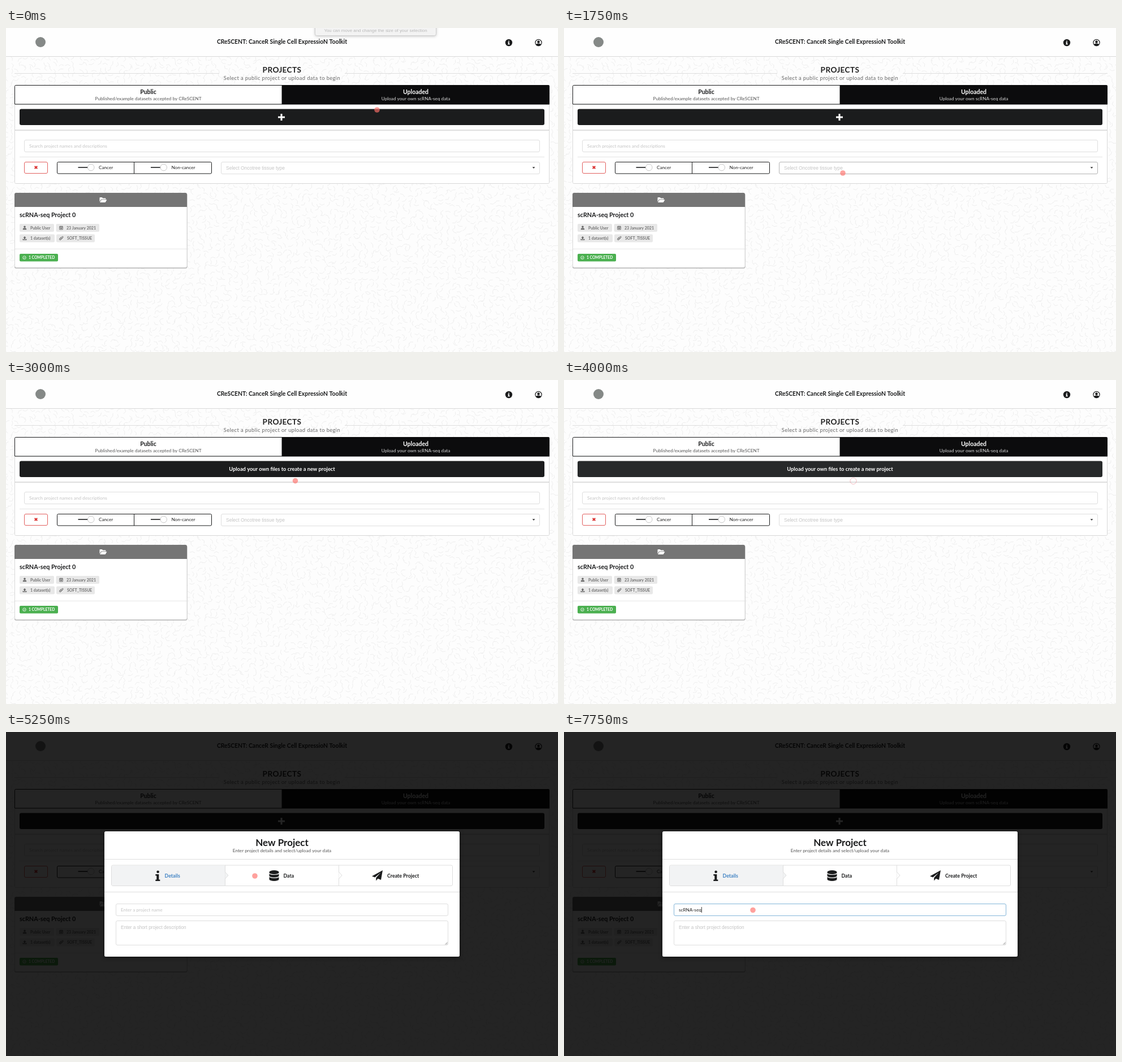
Animation, 976 px wide and 574 px high, one loop 8 s. Source, as an HTML page with a canvas:

```html
<!DOCTYPE html>
<html lang="en">
<head>
<meta charset="utf-8">
<title>Project upload walkthrough</title>
<style>
html, body { margin: 0; width: 100%; height: 100%; overflow: hidden; background: #fdfdfd; }
canvas { display: block; width: 976px; height: 574px; }
</style>
</head>
<body>
<canvas id="stage"></canvas>
<script>
const W = 976, H = 574, LOOP = 8000, STEP = 250;
const INK = '#1b1c1d', LINE = '#dedede', HINT = '#c4c4c4';
const LATO = 'Lato, sans-serif', ARIAL = '"Liberation Sans", Arial, sans-serif';
const canvas = document.getElementById('stage');
const ctx = canvas.getContext('2d');
const ratio = window.devicePixelRatio || 1;
canvas.width = W * ratio;
canvas.height = H * ratio;
ctx.scale(ratio, ratio);

// time, x, y of the pointer
const POINTER = [
  [0, 656, 145], [250, 560, 225], [500, 310, 335], [750, 113, 369], [1000, 230, 364],
  [1250, 440, 333], [1500, 478, 290], [1750, 493, 257], [2000, 497, 246], [2250, 504, 212],
  [2500, 510, 178], [2750, 511.5, 178.5], [4250, 511.5, 179], [4750, 510, 168],
  [5250, 440, 255], [5750, 342, 326], [6000, 333, 329], [6250, 334, 315.5], [8000, 334, 315.5]
];
const TYPED = [[6250, 'sc'], [6750, 'scR'], [7000, 'scRN'], [7250, 'scRNA'], [7500, 'scRNA-s'], [7750, 'scRNA-seq']];

function text(str, x, cy, size, color, { bold, align = 'left', face = LATO, spacing = 0 } = {}) {
  ctx.font = `${bold ? 'bold ' : ''}${size}px ${face}`;
  ctx.letterSpacing = spacing + 'px';
  ctx.textAlign = align;
  ctx.fillStyle = color;
  ctx.fillText(str, x, cy + size * 0.36);
}

function box(x, y, w, h, r, fill, stroke) {
  ctx.beginPath();
  ctx.roundRect(x, y, w, h, r);
  if (fill) { ctx.fillStyle = fill; ctx.fill(); }
  if (stroke) { ctx.strokeStyle = stroke; ctx.lineWidth = 1; ctx.stroke(); }
}

function disc(x, y, r, fill, stroke, width = 1) {
  ctx.beginPath();
  ctx.arc(x, y, r, 0, Math.PI * 2);
  if (fill) { ctx.fillStyle = fill; ctx.fill(); }
  if (stroke) { ctx.strokeStyle = stroke; ctx.lineWidth = width; ctx.stroke(); }
}

function line(x1, y1, x2, y2, color, width = 1) {
  ctx.beginPath();
  ctx.moveTo(x1, y1);
  ctx.lineTo(x2, y2);
  ctx.strokeStyle = color;
  ctx.lineWidth = width;
  ctx.stroke();
}

function icon(d, x, y, fill, stroke, width = 1) {
  const path = new Path2D(d);
  ctx.save();
  ctx.translate(x, y);
  if (fill) { ctx.fillStyle = fill; ctx.fill(path); }
  if (stroke) { ctx.strokeStyle = stroke; ctx.lineWidth = width; ctx.stroke(path); }
  ctx.restore();
}

const PERSON = 'M-1.8-1.7a1.8 1.8 0 1 1 3.6 0a1.8 1.8 0 1 1-3.6 0M-3.2 3.3v-1q0-1.9 2-1.9h2.4q2 0 2 1.9v1z';
const PLUS = 'M-1.5-6h3v4.5H6v3H1.5V6h-3V1.5H-6v-3h4.5z';
const FOLDER = 'M-6.5 3.5v-7q0-1 1-1h3.2l1.5 1.4h4.3q1 0 1 1v1h-7.4q-1 0-1.5.9zM-6 4.5l2.2-4q.4-.7 1.2-.7h9l-2.3 4q-.4.7-1.2.7z';
const INFO = 'M-4.2-3h6V6.4h2V9h-8V6.4h2V-.4h-2zM-2.2-7.2a2.3 2.3 0 1 1 4.6 0a2.3 2.3 0 1 1-4.6 0';
const PLANE = 'M9.5-9.5L6.5 7.5 1 5.2-2.2 9v-5.2L6-5.5-4.2 3-9.5 1z';

function squiggles() {
  let seed = 7;
  const rand = () => (seed = (seed * 16807) % 2147483647) / 2147483647;
  ctx.beginPath();
  for (let y = 54; y < H + 8; y += 10) {
    for (let x = 0; x < W + 8; x += 11) {
      const px = x + rand() * 6 - 3, py = y + rand() * 6 - 3;
      const a = rand() * Math.PI * 2, b = a + (rand() < 0.5 ? 1 : -1) * (0.6 + rand() * 0.6);
      ctx.moveTo(px - Math.cos(a) * 5, py - Math.sin(a) * 5);
      ctx.lineTo(px, py);
      ctx.lineTo(px + Math.cos(b) * 5, py + Math.sin(b) * 5);
    }
  }
  ctx.strokeStyle = '#ededed';
  ctx.lineWidth = 0.9;
  ctx.stroke();
}

function header() {
  ctx.fillStyle = '#fefefe';
  ctx.fillRect(0, 0, W, 50);
  line(0, 50.5, W, 50.5, '#d9d9d9');
  disc(61, 25, 9, '#858987');
  text('CReSCENT: CanceR Single Cell ExpressioN Toolkit', 488, 24, 10.4, INK, { bold: true, align: 'center' });
  disc(889, 26, 6.2, INK);
  icon('M-1.6-1h2.5v3h.8v1.2h-3.4V2h.8V.2h-.7zM-1-2.6a1 1 0 1 1 2 0a1 1 0 1 1-2 0', 889, 26, '#fff');
  disc(941.5, 26, 5.6, '#fff', INK, 1.2);
  icon('M-2.3-1.4a2.3 2.3 0 1 1 4.6 0a2.3 2.3 0 1 1-4.6 0M-4.6 3.2Q-3.5 1.4-1.5 1.4h3q2 0 3.1 1.8Q3 5.6 0 5.6T-4.6 3.2', 941.5, 26, INK);
}

function tabs() {
  line(15, 80.5, 377, 80.5, LINE);
  line(599, 80.5, 961, 80.5, LINE);
  text('PROJECTS', 488, 74, 13.6, '#222', { bold: true, align: 'center', spacing: 0.4 });
  text('Select a public project or upload data to begin', 488, 88.5, 9.36, '#666', { align: 'center', spacing: 0.4 });
  box(15.5, 135.5, 945, 140, [0, 0, 2, 2], '#fff', '#d8d8d8');
  box(15.5, 101.5, 472.5, 33.5, [2, 0, 0, 0], '#fff', INK);
  box(488, 101, 473, 34.5, [0, 2, 0, 0], '#0c0c0d');
  text('Public', 251.5, 113.5, 10.5, INK, { bold: true, align: 'center' });
  text('Published/example datasets accepted by CReSCENT', 251.5, 125, 8.2, '#555', { align: 'center' });
  text('Uploaded', 724.5, 113.5, 10.5, '#fff', { bold: true, align: 'center' });
  text('Upload your own scRNA-seq data', 724.5, 125, 8.2, '#dcdcdc', { align: 'center' });
}

// reveal: 0 shows the plus, 1 shows the label
function uploadButton(reveal, hot) {
  box(24, 143.5, 928, 28.5, 3, hot ? '#27292a' : INK);
  ctx.save();
  ctx.beginPath();
  ctx.rect(24, 143.5, 928, 28.5);
  ctx.clip();
  icon(PLUS, 487, 158 + 25 * reveal, '#fff');
  text('Upload your own files to create a new project', 488, 158 - 28 * (1 - reveal), 9.3, '#fff', { bold: true, align: 'center' });
  ctx.restore();
}

function toggle(x, label, labelX) {
  line(x, 247, x + 18, 247, INK, 1.6);
  disc(x + 22.7, 247, 5.8, '#fff', '#c8c8c8');
  text(label, labelX, 247, 8.2, '#222');
}

function filters(hover) {
  line(16, 181, 960, 181, '#d3d3d3', 1.4);
  box(32.5, 198.5, 911, 21, 2.5, '#fff', LINE);
  text('Search project names and descriptions', 41, 209.5, 8.2, HINT);
  line(24, 228.5, 952, 228.5, '#e4e4e4');
  box(32.5, 237.5, 41, 20, 2.5, '#fff', '#e2605f');
  icon('M-2.3-2.3l4.6 4.6M2.3-2.3l-4.6 4.6', 53, 247, null, '#db3535', 2);
  box(90.5, 237.5, 273, 20.5, 2, '#fff', INK);
  line(226.5, 237, 226.5, 258, INK);
  toggle(127.5, 'Cancer', 164);
  toggle(256, 'Non-cancer', 292.5);
  box(380.5, 237.5, 563, 21, 2.5, '#fff', hover ? '#b4b4b4' : LINE);
  text('Select Oncotree tissue type', 389, 248, 8.5, HINT, { face: ARIAL });
  icon('M-2.4-1.2h4.8L0 1.5z', 933, 247.5, '#333');
}

function tag(x, y, w, label, textX) {
  box(x, y, w, 14, 2, '#e8e8e8');
  text(label, textX, y + 7, 7, '#707070', { bold: true });
}

function card() {
  box(15, 293, 305.5, 133, 3, '#b2b2b2');
  box(15.5, 292.5, 304.5, 132, 3, '#fff', '#d8d8d8');
  box(15, 292, 305, 25, [3, 3, 0, 0], '#757575');
  icon(FOLDER, 172, 304.5, '#fff');
  text('scRNA-seq Project 0', 24, 331, 10.8, INK, { bold: true });
  tag(24, 347, 61, 'Public User', 43);
  tag(88.5, 347, 76.5, '23 January 2021', 107);
  tag(24, 365.5, 62, '1 dataset(s)', 43);
  tag(89, 365.5, 68, 'SOFT_TISSUE', 108);
  const gray = '#666';
  icon(PERSON, 33, 354, gray);
  icon('M-2.8-2.4h5.6v5.4h-5.6zM-2.8-1h5.6M-1.4-3.6v1.6M1.4-3.6v1.6M-1.6.4h3.2M-1.6 1.7h3.2', 97.5, 354, null, gray, 0.9);
  icon('M0-3.5L2.7-.7H1v2.4h-2V-.7h-1.7zM-3.5 1.2h1.8v1h3.4v-1h1.8v2.1h-7z', 33, 372.5, gray);
  icon('M2.1-1.8L-1 1.5q-.6.6-1.1 0t0-1.1L1-2.8q1-1 1.8-.2t-.2 1.9L-.7 2.3q-1.5 1.4-2.5.4t.3-2.4L-.3-2.4', 98, 372.5, null, gray, 0.9);
  line(16, 391.5, 320, 391.5, '#e6e6e6');
  box(24, 400, 68, 13.5, 2, '#4bb050');
  disc(32.5, 406.8, 2.8, null, '#fff', 0.8);
  icon('M-1.4 0l1 1.1 1.8-2', 32.5, 406.8, null, '#fff', 0.8);
  text('1 COMPLETED', 40, 407, 6.75, '#fff', { bold: true });
}

function tooltip(alpha) {
  ctx.save();
  ctx.globalAlpha = alpha;
  ctx.shadowColor = 'rgba(0,0,0,.25)';
  ctx.shadowBlur = 5;
  ctx.shadowOffsetY = 1;
  box(546.5, -12, 214, 25.5, 3, '#f3f3f3');
  ctx.shadowColor = 'transparent';
  box(546.5, -12, 214, 25.5, 3, null, '#cfcfcf');
  text('You can move and change the size of your selection', 653.5, 4.5, 7.9, '#b9b9b9', { align: 'center', face: ARIAL });
  ctx.restore();
}

function stepArrow(x, fill) {
  icon('M0-6L5.5 0 0 6', x, 254, fill, LINE);
}

function database(x, y) {
  const bulge = 'M-8.5-6.5a8.5 3 0 0 1 17 0v13a8.5 3 0 0 1-17 0z';
  icon(bulge, x, y, INK);
  for (const dy of [-5, 0.8]) icon('M-9 0a9 3 0 0 0 18 0', x, y + dy, null, '#fff', 1.2);
}

function modal(t) {
  ctx.fillStyle = 'rgba(0,0,0,.86)';
  ctx.fillRect(0, 0, W, H);
  ctx.save();
  ctx.shadowColor = 'rgba(0,0,0,.5)';
  ctx.shadowBlur = 6;
  ctx.shadowOffsetY = 2;
  box(174, 176, 628, 222, 2.5, '#fff');
  ctx.restore();
  text('New Project', 488, 195.5, 17, INK, { bold: true, align: 'center' });
  text('Enter project details and select/upload your data', 488, 210.5, 8.2, '#555', { align: 'center' });
  line(174, 225.5, 802, 225.5, LINE);
  line(174, 283.5, 802, 283.5, LINE);

  box(186.5, 236, 603, 36.5, 2.5, '#fff', LINE);
  box(187, 236.5, 200.5, 35.5, [2, 0, 0, 2], '#f2f3f4');
  line(387.5, 236, 387.5, 272, LINE);
  line(588.5, 236, 588.5, 272, LINE);
  stepArrow(387.5, '#f2f3f4');
  stepArrow(588.5, '#fff');
  icon(INFO, 268.5, 255, INK);
  database(474, 254.5);
  icon(PLANE, 656.5, 254.5, INK);
  text('Details', 280.5, 254.5, 8.8, '#4183c4', { bold: true });
  text('Data', 490.5, 254.5, 8.8, INK, { bold: true });
  text('Create Project', 674, 254.5, 8.8, INK, { bold: true });

  const focused = t >= 6000;
  box(194.5, 304.5, 587, 21, 2.5, '#fff', focused ? '#85b7d9' : LINE);
  const entry = TYPED.filter(([at]) => at <= t).pop();
  const value = entry ? entry[1] : '';
  if (value) text(value, 203, 315.5, 8.2, '#222');
  else text('Enter a project name', 203, 315.5, 8.1, focused ? '#9a9a9a' : HINT);
  if (focused) {
    ctx.font = `8.2px ${LATO}`;
    const caret = 203.5 + ctx.measureText(value).width;
    line(caret, 310, caret, 320, '#222', 0.9);
  }
  box(194.5, 334.5, 587, 43, 2.5, '#fff', LINE);
  text('Enter a short project description', 203, 346, 8.2, HINT, { face: ARIAL });
  icon('M0 0l4-4M2.2 0L4-1.8', 776.5, 376.5, null, '#777', 0.8);
}

function pointerAt(t) {
  const i = POINTER.findIndex(p => p[0] > t);
  const [t0, x0, y0] = POINTER[i - 1], [t1, x1, y1] = POINTER[i];
  const k = (t - t0) / (t1 - t0);
  return [x0 + (x1 - x0) * k, y0 + (y1 - y0) * k];
}

function draw(t) {
  const [px, py] = pointerAt(t);
  const overSelect = px > 380 && px < 944 && py > 237 && py < 259;
  const reveal = t < 2750 || t >= 4500 ? 0 : t < 3000 || t >= 4250 ? 0.5 : 1;
  const pressed = t >= 3750 && t < 4500;

  ctx.fillStyle = '#fdfdfd';
  ctx.fillRect(0, 0, W, H);
  squiggles();
  header();
  tabs();
  uploadButton(reveal, t >= 3750 && t < 4250);
  filters(overSelect && t < 4250);
  card();
  if (t < 500) tooltip(t < 250 ? 1 : 0.4);
  if (t >= 4250) modal(t);

  if (pressed) disc(px, py, 5.6, null, t < 4250 ? 'rgba(235,140,150,.65)' : 'rgba(190,180,180,.35)', 0.9);
  else disc(px, py, 4.8, 'rgba(255,112,107,.66)');
}

let shown = -1;
function tick(now) {
  const step = Math.floor((now % LOOP) / STEP);
  if (step !== shown) {
    shown = step;
    draw(step * STEP);
  }
  requestAnimationFrame(tick);
}
draw(0);
requestAnimationFrame(tick);
</script>
</body>
</html>
```
